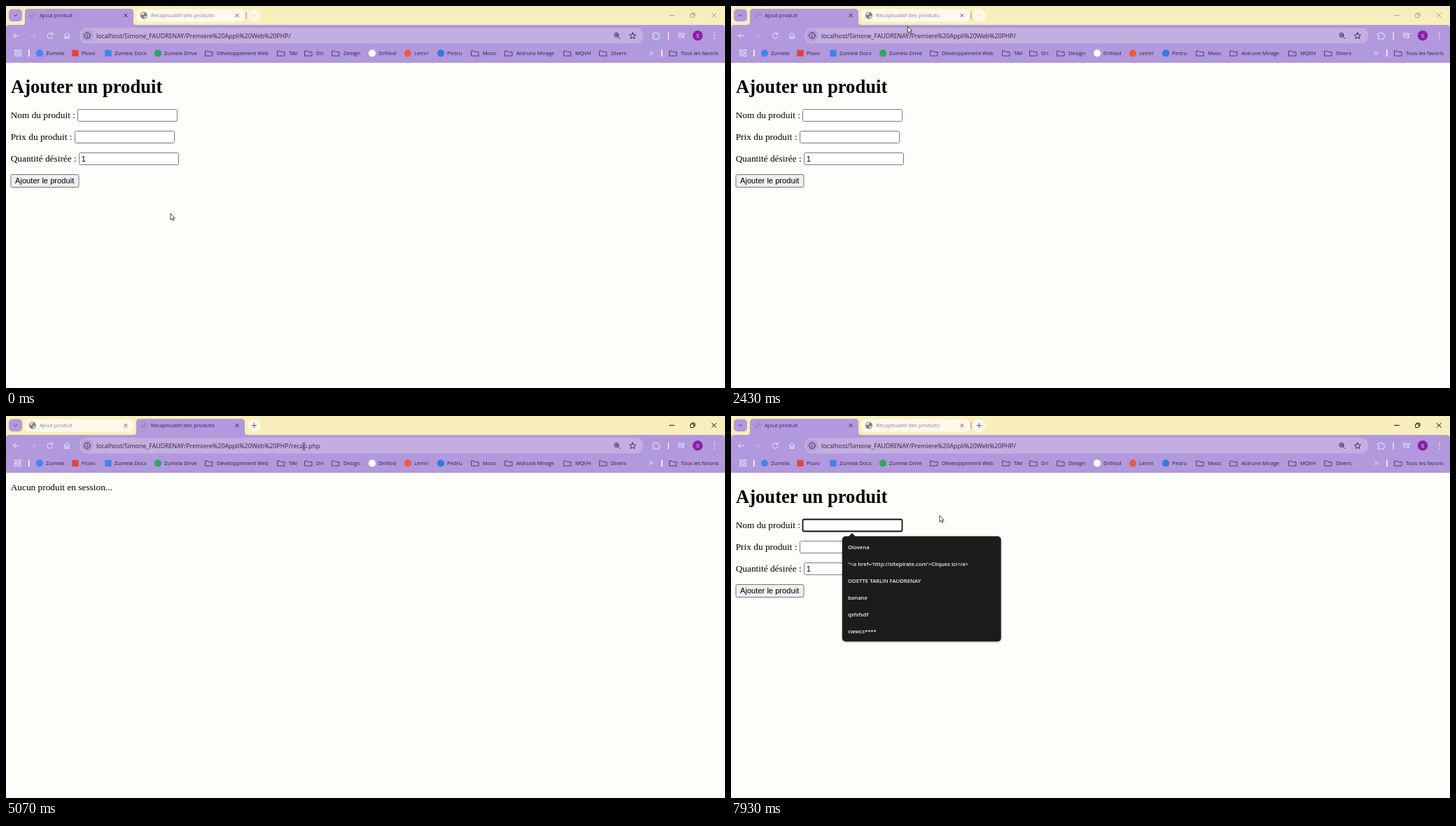
These frames come from a looping animation (1027x545 px, 8000 ms). An HTML page:

```html
<!DOCTYPE html>
<html lang="fr">
<head>
<meta charset="utf-8">
<title>Ajout produit</title>
<style>
html, body { margin: 0; width: 100%; height: 100%; overflow: hidden; background: #fdfdfa; }
svg { display: block; width: 1027px; height: 545px; --ctl: #111; --plus: #7450a8; }
svg.blurred { --ctl: #a89f83; --plus: #eee6d6; }
.ui { font-family: "Open Sans", "Noto Sans", sans-serif; fill: #2c2044; }
.tab { font-size: 7.65px; }
.mark { font-size: 7.55px; }
.url { font-size: 8.85px; }
.page { font: 13.33px "Liberation Serif", "Times New Roman", serif; fill: #000; }
.page .title { font-size: 26.6px; font-weight: bold; }
.sans { font: 11.15px "Liberation Sans", Arial, sans-serif; }
.list { font: 600 7.7px "Open Sans", "Noto Sans", sans-serif; fill: #f1f1ef; }
.box { fill: #fff; stroke: #7b7887; }
.line { fill: none; stroke-width: 1; stroke-linecap: round; stroke-linejoin: round; }
.light { stroke: #d6f4fa; }
.dark { stroke: #392b55; }
</style>
</head>
<body>
<svg id="stage" viewBox="0 0 1027 545"></svg>
<script>
const stage = document.getElementById('stage');
const text = (x, y, s, cls = '', extra = '') =>
  `<text x="${x}" y="${y}" class="${cls}" ${extra}>${s.replace(/</g, '&lt;')}</text>`;
const rect = (x, y, w, h, r, attrs) =>
  `<rect x="${x}" y="${y}" width="${w}" height="${h}" rx="${r}" ${attrs}/>`;
const disc = (x, y, r, attrs) => `<circle cx="${x}" cy="${y}" r="${r}" ${attrs}/>`;
const line = (d, cls, extra = '') => `<path d="${d}" class="line ${cls}" ${extra}/>`;
const cross = (x, y, r, color) =>
  line(`M${x - r} ${y - r}L${x + r} ${y + r}M${x + r} ${y - r}L${x - r} ${y + r}`, '', `stroke="${color}"`);
const folder = x => line(`M${x - 5} 64.2h3.6l1.3 1.4h5.1v5.6h-10z`, '', 'stroke="#4d3c6d" stroke-width=".9"');

function tab(x, label, active) {
  const shape = active
    ? `<path d="M${x - 4} 27Q${x} 27 ${x} 23V9Q${x} 4 ${x + 5} 4H${x + 150}Q${x + 155} 4 ${x + 155} 9V23Q${x + 155} 27 ${x + 159} 27Z" fill="#b298dc"/>`
    : rect(x, 4.5, 155, 18, 6, 'fill="#fffaea"');
  const globe = `<g opacity="${active ? .4 : 1}">${disc(x + 11, 13.5, 5, 'fill="#85838a"')}
    <path d="M${x + 7.2} 12q3-4 4.4-2.2q-.5 2.4-3 3.2zM${x + 11} 17q.6-3.4 4-2.6q-.6 2.4-4 2.6z" fill="${active ? '#cbb7e6' : '#fffaea'}"/></g>`;
  return shape + globe +
    text(x + 21, 16.4, label, 'ui tab', `style="fill:${active ? '#37255c' : '#9570c4'}"`) +
    cross(x + 144, 13.5, 2.2, active ? '#2c2044' : '#71518f');
}

function tabs(first) {
  const address = 'localhost/Simone_FAUDRENAY/Premiere%20Appli%20Web%20PHP/';
  return tab(27, 'Ajout produit', first) + tab(186, 'Récapitulatif des produits', !first) +
    (first ? rect(342.3, 8.5, 1.5, 10, .7, 'fill="#cf9dbb"') : '') +
    text(129, 45.7, address + (first ? '' : 'recap.php'), 'ui url');
}

function toolbar() {
  return `<path d="M0 81V32Q0 27 5 27H1022Q1027 27 1027 32V81Z" fill="#b298dc"/>` +
    rect(105, 31, 805.5, 22.5, 11.2, 'fill="#c3afdf"') +
    disc(116, 42.2, 8.3, 'fill="#b39cd8"') +
    disc(116, 42.2, 4.2, 'class="line dark"') + line('M116 41.8v2.3M116 40v.1', 'dark') +
    line('M18.5 42.3h-8M14 38.8l-3.5 3.5l3.5 3.5', 'light') +
    line('M34.5 42.3h8M39 38.8l3.5 3.5l-3.5 3.5', '', 'stroke="#cbb4e9"') +
    line('M66.2 40.2a3.9 3.9 0 1 0 .6 3M66.7 38v2.6h-2.6', 'light') +
    line('M83.2 42l3.8-3.6l3.8 3.6M84 41.5v5h2v-3h2v3h2v-5', 'light') +
    disc(872, 41.4, 3, 'class="line dark"') + line('M874.3 43.7l3 3M870.7 41.4h2.6M872 40.1v2.6', 'dark') +
    line('M895 38l1.3 2.9l3.2.4l-2.4 2.1l.7 3.1l-2.8-1.6l-2.8 1.6l.7-3.1l-2.4-2.1l3.2-.4z', 'dark') +
    line('M924 39.3h2.8q0-1.9 1.5-1.9t1.5 1.9h2.8v2.8q1.8 0 1.8 1.4t-1.8 1.4v2.2h-8.6v-2.5q1.8 0 1.8-1.3t-1.8-1.3z', 'light') +
    rect(945.5, 37, 1.4, 11, .7, 'fill="#f3ecff"') +
    line('M960 39h7M960 41.6h7M960 44.2h3.5M968 44.7v-5.2h1.8', 'light') +
    disc(966.7, 44.8, 1.3, 'fill="#d6f4fa"') +
    disc(988, 42.2, 7.2, 'fill="#8b1fa6"') +
    text(988, 44.9, 'S', 'ui tab', 'text-anchor="middle" style="fill:#fff"') +
    [38.5, 42.2, 45.9].map(y => disc(1012, y, .9, 'fill="#d6f4fa"')).join('');
}

function bookmarks() {
  const folders = [[290, 'Développement Web'], [393, 'TAV'], [432, 'Dri'], [471, 'Design'], [670, 'Mooc'],
    [718, 'Aldrune Mirage'], [802, 'MQVH'], [853, 'Divers'], [953, 'Tous les favoris']];
  const sites = [[48, 'Zumela', '#4285f4'], [99, 'Pluvo', '#e0453a', 1], [146, 'Zumela Docs', '#3f83ee', 1],
    [217, 'Zumela Drive', '#2fa65b'], [523, 'DriNod', '#fff'], [574, 'Lemri', '#ef5a3c'], [621, 'Pedru', '#2a7fdc']];
  const grid = [12.5, 18].map(x => [62.5, 68].map(y => rect(x, y, 3.6, 3.6, .4, 'class="line light"')).join('')).join('');
  return grid + rect(32, 62, 1.5, 10.5, .7, 'fill="#fff"') + rect(936, 62, 1.5, 10.5, .7, 'fill="#fff"') +
    line('M919 65l2.2 2.3l-2.2 2.3M921.8 65l2.2 2.3l-2.2 2.3', 'light') +
    folders.map(([x, s]) => folder(x) + text(x + 11, 70, s, 'ui mark')).join('') +
    sites.map(([x, s, c, square]) =>
      (square ? rect(x - 4.7, 62.7, 9.4, 9.4, 1, `fill="${c}"`) : disc(x, 67.4, 5.1, `fill="${c}"`)) +
      text(x + 9, 70, s, 'ui mark')).join('');
}

function form() {
  const box = (x, y, id) => rect(x, y, 142, 17, 2, `class="box" id="${id}"`);
  return text(7, 124, 'Ajouter un produit', 'title') +
    text(6.7, 160.3, 'Nom du produit :') + box(102.5, 147.5, 'name') +
    text(6.7, 191.3, 'Prix du produit :') + box(98.5, 178.5, 'price') +
    text(6.7, 222.3, 'Quantité désirée :') + box(104.5, 209.5, 'count') + text(107.7, 222.4, '1', 'sans') +
    rect(7, 240.5, 97, 18, 2, 'fill="#efefef" stroke="#777"') + text(13, 253.4, 'Ajouter le produit', 'sans');
}

function suggestions() {
  const items = ['Olovena', `"<a href='http://sitepirate.com'>Cliquez ici</a>`, 'ODETTE TARLIN FAUDRENAY',
    'banane', 'qsfsfsdf', 'cwwcs****'];
  return rect(158, 172, 229, 152, 6, 'fill="#000" opacity=".13"') +
    '<path d="M167.5 172.5L173 167L178.5 172.5Z" fill="#1b1c1e"/>' +
    rect(158.8, 171.5, 226.9, 150.3, 5, 'fill="#1b1c1e"') +
    items.map((s, i) => text(167, 189.6 + 24 * i, s, 'list')).join('');
}

stage.innerHTML = rect(0, 0, 1027, 545, 0, 'fill="#fdfdfa"') + rect(0, 0, 1027, 40, 0, 'fill="#f8eebc"') +
  toolbar() + rect(4, 4.5, 19, 17.5, 5, 'fill="#b298dc"') +
  line('M11.5 12.5l2 2l2-2', 'dark', 'stroke-width="1.2"') +
  disc(354.3, 13.5, 9.2, 'fill="#fff9e6"') +
  line('M351 13.5h6.6M354.3 10.2v6.6', '', 'style="stroke:var(--plus)"') +
  `<g style="stroke:var(--ctl)">${line('M947.5 13.3h7', '')}${rect(977.5, 11.5, 5, 5, .8, 'class="line"')}` +
  `${line('M979.3 10h3.7q1 0 1 1v3.7', '')}${line('M1008.3 10.3l6 6M1014.3 10.3l-6 6', '')}</g>` +
  bookmarks() +
  `<g id="add">${tabs(true)}<g class="page">${form()}</g></g>` +
  `<g id="recap">${tabs(false)}${text(6.7, 105.8, 'Aucun produit en session...', 'page')}</g>` +
  `<g id="popup">${suggestions()}</g>` +
  `<path id="arrow" d="M0 0V9.2L2.1 7.3L3.5 10.3L5 9.6L3.7 6.7H6.3Z" fill="#fff" stroke="#222" stroke-width=".85"/>` +
  `<path id="beam" d="M-2 -4.8h1.4l.6.6l.6-.6H2M0 -4.2V4.2M-2 4.8h1.4l.6-.6l.6.6H2" fill="none" stroke="#222" stroke-width=".9"/>`;

const part = Object.fromEntries([...stage.querySelectorAll('[id]')].map(e => [e.id, e]));

// Pointer stops: time, x, y
const path = [[0, 235, 296], [30, 235, 296], [430, 205, 225], [830, 160, 201], [1250, 300, 513], [1690, 276, 249],
  [1930, 261, 214], [2500, 252, 21], [2650, 251, 14], [2780, 250, 16], [3070, 237, 156], [4000, 237, 156],
  [4500, 414, 47], [4800, 430, 45], [5200, 424, 43], [5630, 399, 97], [5670, 399, 97], [6120, 95, 14],
  [6480, 97, 15], [6630, 126, 143], [6810, 135, 155], [7770, 135, 155], [7930, 298, 142], [8000, 298, 142]];

function pointer(t) {
  const i = path.findIndex(p => p[0] > t);
  const [t0, x0, y0] = path[i - 1], [t1, x1, y1] = path[i];
  const u = (t - t0) / (t1 - t0), k = u * u * (3 - 2 * u);
  return [x0 + (x1 - x0) * k, y0 + (y1 - y0) * k];
}

const inside = (x, y, l, t, r, b) => x > l && x < r && y > t && y < b;
const show = (el, on) => el.style.display = on ? '' : 'none';

function draw(now) {
  const t = now % 8000;
  const onForm = t < 2650 || t >= 6200;
  const focused = t >= 6815;
  const [x, y] = pointer(t);
  const typing = inside(x, y, 125, 31, 860, 53) ||
    onForm && (inside(x, y, 102, 147, 245, 165) || inside(x, y, 98, 178, 241, 196) || inside(x, y, 104, 209, 247, 227));

  stage.classList.toggle('blurred', t < 2650);
  show(part.add, onForm);
  show(part.recap, !onForm);
  part.name.style.stroke = focused ? '#101010' : '';
  part.name.style.strokeWidth = focused ? 1.8 : 1;
  part.popup.style.opacity = Math.min(1, Math.max(0, (t - 7000) / 260));
  show(part.arrow, !typing);
  show(part.beam, typing);
  part[typing ? 'beam' : 'arrow'].setAttribute('transform', `translate(${x} ${y})`);
}

let start;
function tick(now) {
  start ??= now;
  draw(now - start);
  requestAnimationFrame(tick);
}
draw(0);
requestAnimationFrame(tick);
</script>
</body>
</html>
```
